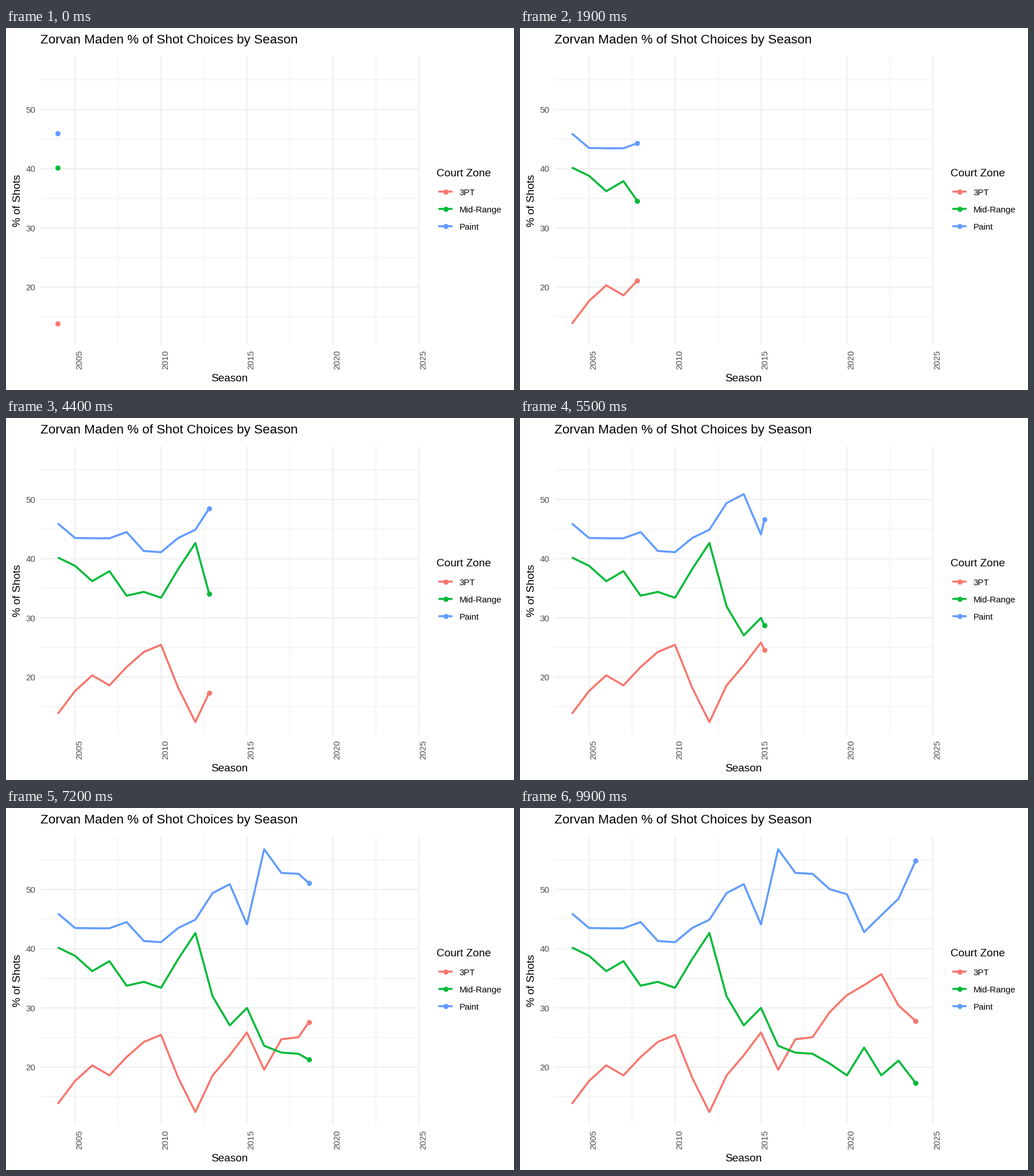
Recreate the animation shown at these times as a matplotlib script. Size 885 by 632 pixels, loop 10 s.

```python
import numpy as np
import matplotlib.pyplot as plt
from matplotlib.animation import FuncAnimation

W, H, DPI = 885, 632, 100
FRAMES, INTERVAL = 100, 100
LEFT, RIGHT, TOP, BOTTOM = 60, 719.5, 49, 553
GRID, TICK = "#EBEBEB", "#4D4D4D"

SEASONS = np.arange(2004, 2025)
three = np.array([
    13.8, 17.65, 20.3, 18.6, 21.7, 24.25, 25.45, 18.2, 12.4, 18.6, 22,
    25.85, 19.55, 24.7, 25.05, 29.3, 32.15, 33.85, 35.7, 30.4, 27.8])
mid = np.array([
    40.2, 38.8, 36.2, 37.9, 33.75, 34.4, 33.4, 38.25, 42.65, 31.95, 27.05,
    30, 23.6, 22.45, 22.25, 20.6, 18.6, 23.3, 18.6, 21.1, 17.3])
# Paint takes the remaining shots, apart from a few heaves.
paint = 99.95 - three - mid
ZONES = [("3PT", "#F8766D", three),
         ("Mid-Range", "#00BA38", mid),
         ("Paint", "#619CFF", paint)]

# Each season lands on a whole frame.
KEYS = np.round(np.linspace(0, FRAMES - 1, len(SEASONS)))


def px(size):
    return size * 72 / DPI


def sx(season):
    return 60.4 + 29.95 * (np.asarray(season) - 2003)


def sy(value):
    return 142.3 + 10.335 * (50 - np.asarray(value))


plt.rcParams["font.family"] = "Liberation Sans"
fig = plt.figure(figsize=(W / DPI, H / DPI), dpi=DPI, facecolor="white")
ax = fig.add_axes([0, 0, 1, 1])
ax.set_xlim(0, W)
ax.set_ylim(H, 0)
ax.axis("off")


def label(x, y, text, size, color="black", ha="left", rotation=0):
    ax.text(x, y, text, fontsize=px(size), color=color, ha=ha, va="baseline",
            rotation=rotation, rotation_mode="anchor")


def rule(xs, ys, major):
    ax.plot(xs, ys, color=GRID, lw=px(1.6 if major else 0.9),
            solid_capstyle="butt", snap=False, zorder=1)


def stroke(xs, ys, color):
    return ax.plot(xs, ys, color=color, lw=px(3.5), solid_capstyle="butt",
                   solid_joinstyle="round", snap=False, zorder=2)[0]


def dot(x, y, color):
    return ax.plot([x], [y], "o", color=color, ms=px(9), mew=0,
                   snap=False, zorder=3)[0]


def draw_grid():
    for season in np.arange(2005, 2025.1, 2.5):
        rule([sx(season)] * 2, [TOP, BOTTOM], season % 5 == 0)
    for value in range(15, 56, 5):
        rule([LEFT, RIGHT], [sy(value)] * 2, value % 10 == 0)


def draw_labels():
    label(59.5, 26.9, "Zorvan Maden % of Shot Choices by Season", 22.4)
    label(389.5, 617.2, "Season", 19, ha="center")
    label(24.6, 301.3, "% of Shots", 19, ha="center", rotation=90)
    for season in range(2005, 2026, 5):
        label(sx(season) + 11.9, 595.6, str(season), 15, TICK, rotation=90)
    for value in range(20, 51, 10):
        label(51.2, sy(value) + 5.8, str(value), 15, TICK, ha="right")


def draw_legend():
    label(749.8, 258.7, "Court Zone", 19)
    for i, (name, color, _) in enumerate(ZONES):
        y = 285.6 + 30.2 * i
        stroke([753.3, 777.8], [y, y], color)
        dot(765.6, y, color)
        label(789.8, y + 5.9, name, 15.1)


draw_grid()
draw_labels()
draw_legend()
series = [(values, stroke([], [], color), dot(0, 0, color))
          for _, color, values in ZONES]


def update(frame):
    now = np.interp(frame, KEYS, SEASONS)
    past = SEASONS < now
    xs = sx(np.append(SEASONS[past], now))
    for values, line, head in series:
        tip = np.interp(now, SEASONS, values)
        ys = sy(np.append(values[past], tip))
        line.set_data(xs, ys)
        head.set_data(xs[-1:], ys[-1:])
    return [artist for _, line, head in series for artist in (line, head)]


anim = FuncAnimation(fig, update, frames=FRAMES, interval=INTERVAL,
                     repeat=True, repeat_delay=0)
plt.show()
```
